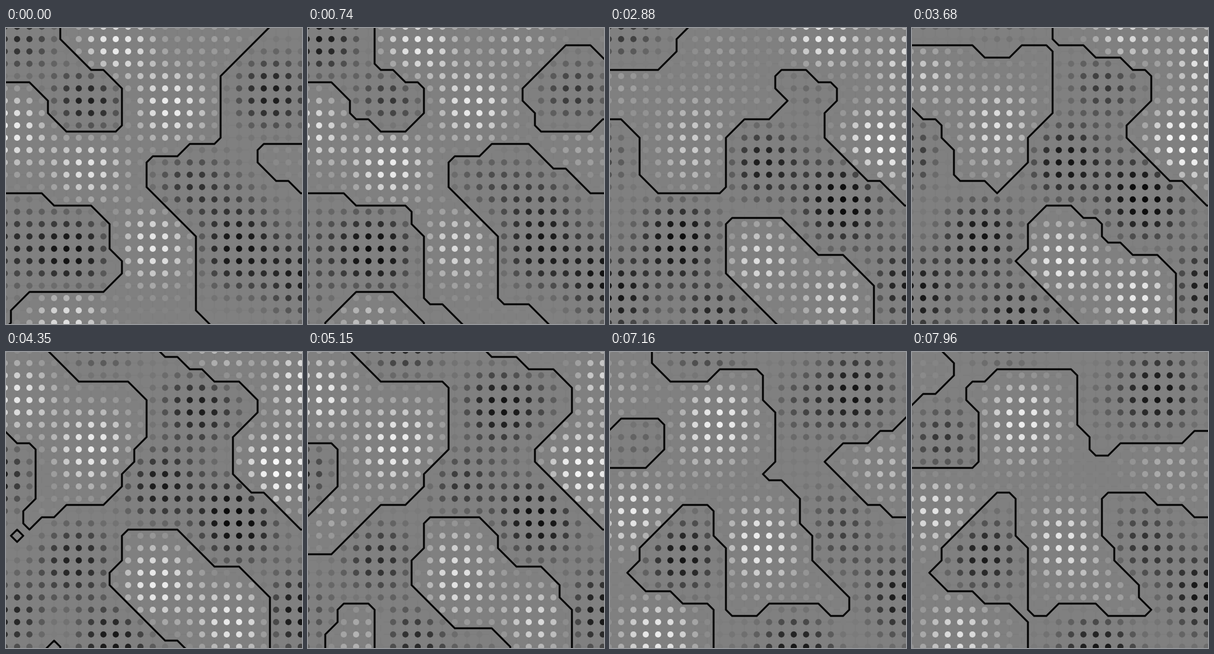
Recreate the animation shown at these times as an HTML page with a canvas. Size 480 px wide and 480 px high, loop 8 s.

```html
<!DOCTYPE html>
<html lang="en">
<head>
<meta charset="utf-8">
<title>Marching squares</title>
<style>
  html, body { margin: 0; height: 100%; overflow: hidden; background: #808080; }
  canvas { display: block; }
</style>
</head>
<body>
<canvas id="stage" width="480" height="480"></canvas>
<script>
const ctx = document.getElementById('stage').getContext('2d');
const SIZE = 480, LOOP = 8000, STEP = 100;
const CELL = 20, ORIGIN = -2, COUNT = 26;
const RADIUS = 57, FADE = 2, GAIN = 1.3;

// Key points of the field: x, y and the second at which each one peaks.
const hills = [
  [178, 28, .2], [345, 12, 2.6], [268, 128, .2], [485, 52, 3.9],
  [5, 165, -.2], [18, 70, 4.9], [40, 260, 7.1],
  [133, 222, .8], [140, 155, 4.7], [180, 110, 7.6],
  [438, 188, 2.9], [447, 192, 5.1], [400, 190, 10.3],
  [243, 352, -.6], [242, 380, 4], [244, 308, 7.1],
  [370, 435, 4], [320, 390, 10], [100, 472, -.9], [78, 460, 6.9]
];
const pits = [
  [18, 15, 1.4], [135, 118, -.7], [432, 108, -.8], [155, -28, 6],
  [376, 360, 0], [379, 282, 2.6], [374, 260, 4.9], [378, 320, 9.4],
  [107, 368, .3], [113, 340, 3], [116, 328, 7.2],
  [6, 350, -1.5], [9, 432, 3.2], [-25, 205, 4.4], [52, 140, 9.4],
  [482, 400, .8], [479, 425, 4.4], [480, 392, 8],
  [300, 258, -1.5], [250, 218, 3.6], [315, 86, 5], [400, 66, 7.6],
  [174, 468, 3.9], [304, 484, 7.6]
];

const pos = i => ORIGIN + i * CELL;
const bell = d => Math.exp(-d * d);
const grid = Array.from({ length: COUNT }, (_, i) => i);

function sampleField(t) {
  const weigh = (points, sign) =>
    points.map(([x, y, peak]) => ({ x, y, h: sign * bell((t - peak) / FADE) }));
  const bumps = [...weigh(hills, 1), ...weigh(pits, -1)];
  const valueAt = (px, py) => Math.tanh(GAIN * bumps.reduce(
    (sum, { x, y, h }) => sum + h * bell(Math.hypot(px - x, py - y) / RADIUS), 0));
  return grid.map(row => grid.map(col => valueAt(pos(col), pos(row))));
}

function drawGrid() {
  ctx.strokeStyle = 'rgba(0,0,0,.05)';
  ctx.lineWidth = 1;
  ctx.beginPath();
  for (const i of grid) {
    ctx.moveTo(pos(i), 0);
    ctx.lineTo(pos(i), SIZE);
    ctx.moveTo(0, pos(i));
    ctx.lineTo(SIZE, pos(i));
  }
  ctx.stroke();
}

function drawDots(field) {
  field.forEach((line, row) => line.forEach((value, col) => {
    const g = Math.round(128 + 127 * value);
    ctx.fillStyle = `rgb(${g},${g},${g})`;
    ctx.beginPath();
    ctx.arc(pos(col), pos(row), 5, 0, Math.PI * 2);
    ctx.fill();
  }));
}

// Joins the midpoints of the cell edges on which the field changes sign.
function drawContours(field) {
  const half = CELL / 2;
  ctx.strokeStyle = '#000';
  ctx.lineWidth = 3;
  ctx.lineCap = 'round';
  ctx.beginPath();
  for (let row = 0; row < COUNT - 1; row++) {
    for (let col = 0; col < COUNT - 1; col++) {
      const x = pos(col), y = pos(row);
      const a = field[row][col] > 0, b = field[row][col + 1] > 0;
      const c = field[row + 1][col + 1] > 0, d = field[row + 1][col] > 0;
      const points = [];
      if (a !== b) points.push([x + half, y]);
      if (b !== c) points.push([x + CELL, y + half]);
      if (c !== d) points.push([x + half, y + CELL]);
      if (d !== a) points.push([x, y + half]);
      for (let i = 0; i < points.length; i += 2) {
        ctx.moveTo(...points[i]);
        ctx.lineTo(...points[i + 1]);
      }
    }
  }
  ctx.stroke();
}

function frame() {
  const t = Math.floor(performance.now() % LOOP / STEP) * STEP / 1000;
  const field = sampleField(t);
  ctx.fillStyle = '#808080';
  ctx.fillRect(0, 0, SIZE, SIZE);
  drawGrid();
  drawDots(field);
  drawContours(field);
  requestAnimationFrame(frame);
}
frame();
</script>
</body>
</html>
```
